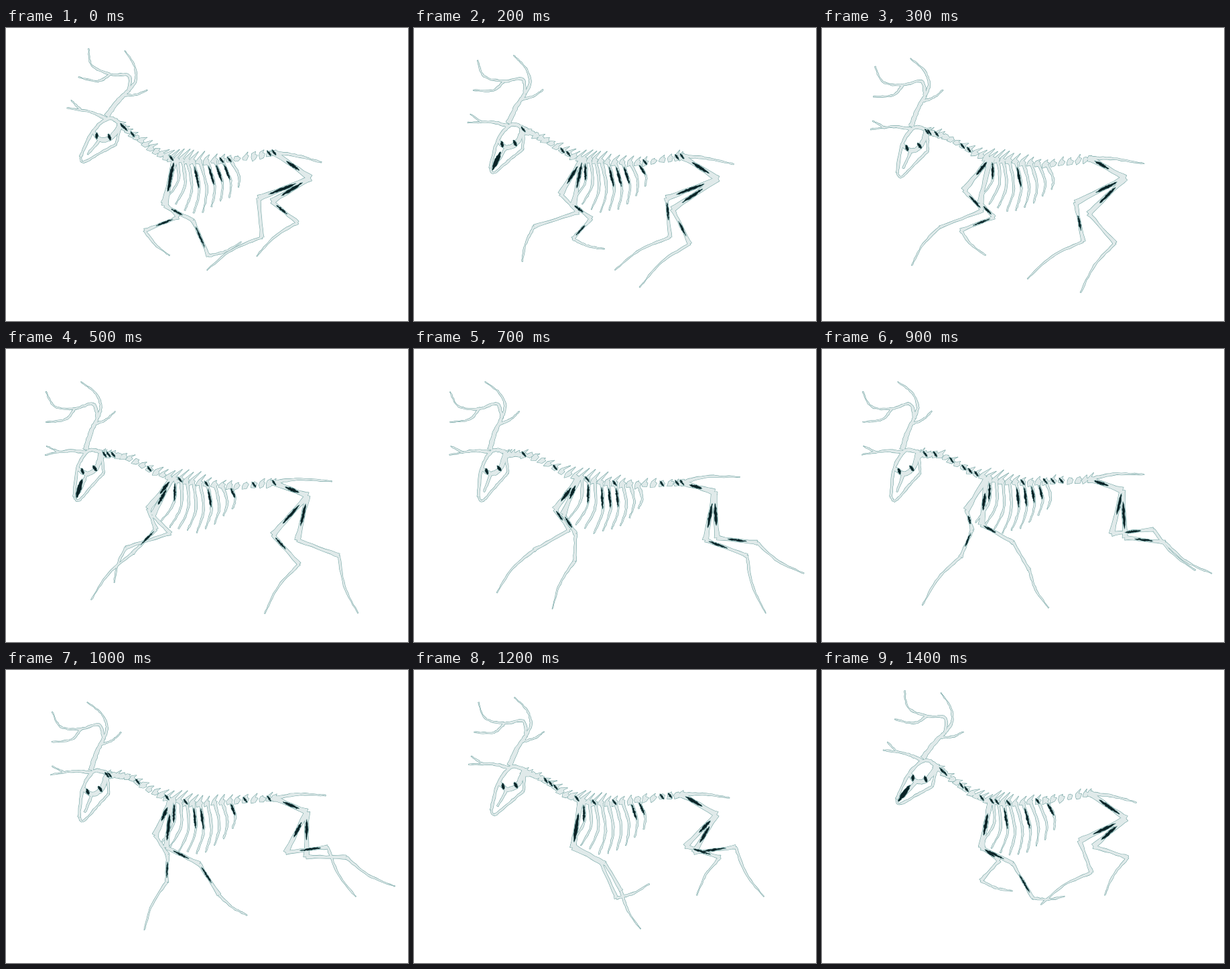
Recreate the animation shown at these times as an HTML page with a canvas. Size 600x437 px, loop 1500 ms.

```html
<!DOCTYPE html>
<html lang="en">
<head>
<meta charset="utf-8">
<title>Running deer skeleton</title>
<style>
html, body { margin: 0; width: 100%; height: 100%; overflow: hidden; background: #fff; }
canvas { display: block; width: 100vw; height: 100vh; }
</style>
</head>
<body>
<canvas id="stage" width="600" height="437"></canvas>
<script>
const ctx = document.getElementById("stage").getContext("2d");
const LOOP = 1500, STEP = 100;
const BONE = "#e0eaea", EDGE = "#74a5a4", DARK = "#0b2327";

// One stride, evenly spaced in time; the second leg of a pair repeats it later.
// front: elbow, knee, fetlock, toe
const frontStride = [
  [236,261, 257,282, 207,302, 244,339],
  [212,242, 240,272, 176,297, 134,354],
  [216,240, 224,270, 207,310, 150,382],
  [238,262, 285,288, 309,329, 338,386],
  [237,265, 279,287, 302,340, 351,319]
];
// hind: stifle, hock, toe
const hindStride = [
  [377,254, 382,312, 300,361],
  [391,274, 424,322, 358,391],
  [435,285, 497,308, 525,394],
  [452,280, 511,284, 584,325],
  [418,272, 480,264, 522,338],
  [402,261, 448,285, 398,337]
];
const FRONT_LAG = 300, HIND_LAG = 200;

let time, seed, shapes, shades;

function random() {
  seed = (seed * 16807) % 2147483647;
  return seed / 2147483647;
}
const jitter = size => (random() - 0.5) * 2 * size;
const mix = (a, b, u) => [a[0] + (b[0] - a[0]) * u, a[1] + (b[1] - a[1]) * u];
const swing = (size, peak) => size * Math.cos((time - peak) / LOOP * 2 * Math.PI);

// Catmull-Rom blend of four vectors.
function blend(p0, p1, p2, p3, s) {
  return p1.map((v, k) => v + 0.5 * s * (p2[k] - p0[k]
    + s * (2 * p0[k] - 5 * v + 4 * p2[k] - p3[k]
    + s * (3 * v - p0[k] - 3 * p2[k] + p3[k]))));
}

function strideAt(keys, when) {
  const count = keys.length;
  const place = ((when + LOOP) % LOOP) / LOOP * count;
  const i = Math.floor(place), key = k => keys[(i + k + count) % count];
  const flat = blend(key(-1), key(0), key(1), key(2), place - i);
  return flat.flatMap((x, k) => k % 2 ? [] : [[x, flat[k + 1]]]);
}

function along(points, u) {
  const last = points.length - 1;
  const i = Math.min(Math.floor(u * last), last - 1);
  const a = points[i], b = points[i + 1];
  return blend(points[i - 1] || a, a, b, points[i + 2] || b, u * last - i);
}

function frameAt(points, u) {
  const a = along(points, Math.max(0, u - 0.01)), b = along(points, Math.min(1, u + 0.01));
  const length = Math.hypot(b[0] - a[0], b[1] - a[1]) || 1;
  return { at: along(points, u), dx: (b[0] - a[0]) / length, dy: (b[1] - a[1]) / length };
}

function outline(points, width, rough = 0.6) {
  const steps = (points.length - 1) * 8, left = [], right = [];
  for (let i = 0; i <= steps; i++) {
    const u = i / steps, { at, dx, dy } = frameAt(points, u);
    const half = width(u) / 2, r = Math.min(rough, half);
    const l = half + jitter(r), m = half + jitter(r);
    left.push([at[0] - dy * l, at[1] + dx * l]);
    right.unshift([at[0] + dy * m, at[1] - dx * m]);
  }
  return left.concat(right);
}

function ribbon(points, from, to) {
  shapes.push(outline(points, u => from + (to - from) * u));
}

function shade(a, b, width) {
  shades.push(outline([a, mix(a, b, 0.5), b], u => width * Math.sin(Math.PI * u)));
}

function bone(a, b, width, dark) {
  shapes.push(outline([a, b], u => width * (0.6 + 0.4 * (2 * u - 1) ** 2)));
  if (random() < dark) {
    const start = 0.05 + random() * 0.3;
    shade(mix(a, b, start), mix(a, b, start + 0.35 + random() * 0.25), width * 0.45);
  }
}

// Head coordinates are relative to the base of the antlers.
function drawHead([baseX, baseY], pitch) {
  const cos = Math.cos(pitch), sin = Math.sin(pitch);
  const place = ([x, y]) => [baseX + x * cos - y * sin, baseY + x * sin + y * cos];
  const branch = (points, from, to) => ribbon(points.map(place), from, to);
  const fork = [18, -47], split = [-16, -61];
  branch([[0, 0], [8, -26], fork], 7, 4);
  branch([fork, [11, -68], split, [-46, -64], [-59, -86]], 4, 0.8);
  branch([split, [-30, -45], [-59, -41]], 3.2, 0.8);
  branch([fork, [23, -65], [14, -85], [-7, -101]], 4, 0.6);
  branch([[14, -38], [31, -45], [44, -57]], 3, 0.8);
  branch([[0, 4], [-26, 2], [-60, 8]], 4.5, 0.8);
  branch([[-40, 4], [-58, -5]], 2.5, 0.6);

  const occiput = [24, 4], brow = [-12, 28], nose = [-17, 70], chin = [-10, 76], jaw = [27, 35];
  branch([occiput, [4, 2], brow, nose], 5, 3);
  branch([nose, chin, mix(chin, jaw, 0.55), jaw], 2, 3);
  branch([jaw, occiput], 2.5, 4);
  branch([brow, [2, 36], [16, 28], occiput], 5, 7);
  branch([[2, 36], mix(nose, jaw, 0.2)], 4, 2);
  shade(place([-6, 28]), place([-3, 37]), 4);
  shade(place([11, 24]), place([17, 32]), 4);
  if (random() < 0.5) shade(place(mix(nose, chin, 0.5)), place([-5, 44]), 6);
}

function drawSpine(points) {
  const count = 27;
  for (let i = 0; i <= count; i++) {
    const u = i / count, { at, dx, dy } = frameAt(points, u);
    const spike = 6 + 9 * Math.exp(-(((u - 0.52) / 0.16) ** 2)) + jitter(3);
    const local = [[-4, -1], [-2, 3], [spike * 0.6, spike], [2, 3],
      [5, 1], [2, -4], [-4, -5 + jitter(2)]];
    shapes.push(local.map(([x, y]) => [x + jitter(1), y + jitter(1)])
      .map(([x, y]) => [at[0] + x * dx + y * dy, at[1] + x * dy - y * dx]));
    if (random() < 0.25) shade([at[0] - 3, at[1] - 4], [at[0] + 3, at[1] + 4], 2.5);
  }
}

function drawRibs(spine, sway) {
  const count = 9;
  for (let i = 0; i < count; i++) {
    const u = i / (count - 1);
    const top = along(spine, 0.49 + u * 0.29);
    const low = [234 + 107 * u + sway, 256 - 18 * u + 26 * Math.sin(Math.PI * u) + jitter(3)];
    const middle = mix(top, low, 0.55);
    middle[0] += 10 - 4 * u;
    ribbon([top, middle, low], 4, 1);
    if (random() < 0.4) shade(mix(top, middle, 0.2), mix(top, middle, 0.95), 3);
  }
}

function drawLeg(joints, widths) {
  const foot = joints.length - 2;
  for (let i = 0; i < foot; i++) bone(joints[i], joints[i + 1], widths[i], 0.85 - i * 0.2);
  const [ankle, toe] = joints.slice(foot);
  const bend = mix(ankle, toe, 0.5);
  bend[0] -= (toe[1] - ankle[1]) * 0.07;
  bend[1] += (toe[0] - ankle[0]) * 0.07;
  ribbon([ankle, bend, toe], 3.5, 0.8);
}

function paint(list, color, stroke) {
  ctx.fillStyle = ctx.strokeStyle = color;
  for (const points of list) {
    ctx.beginPath();
    points.forEach(([x, y]) => ctx.lineTo(x, y));
    ctx.closePath();
    if (stroke) ctx.stroke(); else ctx.fill();
  }
}

function draw(now) {
  time = Math.floor((now % LOOP) / STEP) * STEP;
  seed = 7919 * (time + 37);
  shapes = [];
  shades = [];

  // The head stays low and tosses up once per stride.
  const lift = ((1 + swing(1, 1450)) / 2) ** 3;
  const head = [132 + swing(19, 1440), 150 - 19 * lift];
  const spine = [
    [head[0] + 24 - 4 * lift, head[1] + 7 + 5 * lift],
    [187 + swing(11, 1440), 162 + swing(3, 50)],
    [233 + swing(5, 50), 188 + swing(3, 50)],
    [280, 198],
    [340, 198 + swing(6, 480)],
    [400, 192 + swing(8, 600)]
  ];
  const hip = [451 + swing(3, 50), 218 + swing(7, 150)];
  const tail = [[435, 190 + swing(5, 350)], [478 + swing(9, 600), 195 + swing(8, 200)]];

  drawHead(head, lift * Math.PI / 9);
  drawSpine(spine);
  ribbon([spine[5], ...tail], 5, 0.8);
  drawRibs(spine, swing(6, 0));
  bone(spine[5], hip, 9, 0.9);
  for (const lag of [0, FRONT_LAG]) {
    const leg = strideAt(frontStride, time - lag);
    drawLeg([along(spine, 0.47), ...leg], [9, 6, 5]);
  }
  for (const lag of [0, HIND_LAG]) {
    drawLeg([hip, ...strideAt(hindStride, time - lag)], [8.5, 6]);
  }

  ctx.fillStyle = "#fff";
  ctx.fillRect(0, 0, 600, 437);
  ctx.lineWidth = 1.2;
  ctx.lineJoin = "round";
  paint(shapes, EDGE, true);
  paint(shapes, BONE, false);
  paint(shades, EDGE, true);
  paint(shades, DARK, false);
  requestAnimationFrame(draw);
}
requestAnimationFrame(draw);
</script>
</body>
</html>
```
